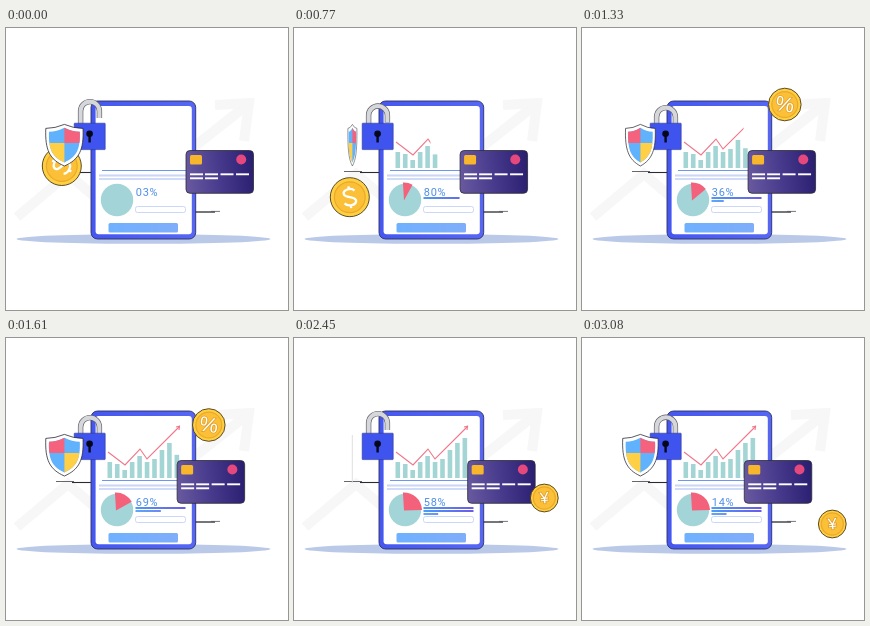
Recreate the animation shown at these times as an HTML page with a canvas. Size 282 px wide and 282 px high, loop 3.15 s.

```html
<!DOCTYPE html>
<html lang="en">
<head>
<meta charset="utf-8">
<title>Secure payments</title>
<style>
  html, body { margin: 0; width: 100%; height: 100%; overflow: hidden; background: #fff; }
  canvas { display: block; width: 282px; height: 282px; }
</style>
</head>
<body>
<canvas id="stage"></canvas>
<script>
const SIZE = 282, LOOP = 3150, STEP = 70, CYCLE = 2100;
const canvas = document.getElementById('stage');
const dpr = window.devicePixelRatio || 1;
canvas.width = canvas.height = SIZE * dpr;
const c = canvas.getContext('2d');
const SANS = '"Liberation Sans", Arial, sans-serif';
const EDGE = '#2b2b34';

const clamp = (v, lo, hi) => Math.min(hi, Math.max(lo, v));

// Piecewise linear value through [time, value] points
function track(points, t) {
  for (let i = 1; i < points.length; i++) {
    const [t0, v0] = points[i - 1], [t1, v1] = points[i];
    if (t <= t1) return v0 + (v1 - v0) * (t - t0) / (t1 - t0);
  }
  return points[points.length - 1][1];
}

function paint(fill, stroke, width) {
  if (fill) { c.fillStyle = fill; c.fill(); }
  if (stroke) { c.strokeStyle = stroke; c.lineWidth = width; c.stroke(); }
}

function box(x, y, w, h, r, fill, stroke, width = 1) {
  c.beginPath();
  c.roundRect(x, y, w, h, r);
  paint(fill, stroke, width);
}

function disc(x, y, r, fill, stroke, width = 1) {
  c.beginPath();
  c.arc(x, y, r, 0, Math.PI * 2);
  paint(fill, stroke, width);
}

function line(points, color, width) {
  c.beginPath();
  points.forEach(([x, y]) => c.lineTo(x, y));
  paint(null, color, width);
}

function ramp(x0, y0, x1, y1, ...colors) {
  const g = c.createLinearGradient(x0, y0, x1, y1);
  colors.forEach((col, i) => g.addColorStop(i / (colors.length - 1), col));
  return g;
}

function backdrop() {
  line([[11, 189], [62, 146], [96, 175], [150, 149], [241, 77]], '#f7f7f7', 10);
  line([[209, 77], [243, 75], [238, 113]], '#f7f7f7', 10);
  c.beginPath();
  c.ellipse(137.5, 211, 127, 4.8, 0, 0, Math.PI * 2);
  paint('#bac9e8');
  line([[50, 143.5], [68, 143.5]], '#55565c', 0.9);
  line([[66, 144.5], [86, 144.5]], EDGE, 1.1);
  line([[189, 184], [209, 184]], EDGE, 1.3);
  line([[205, 183.4], [214, 183.4]], '#55565c', 0.8);
}

function phone() {
  box(85, 73, 104.7, 138, 6.5, ramp(85, 0, 190, 0, '#4557ee', '#5767f4'), '#2c2f66', 0.9);
  box(89.6, 78, 96.2, 128.2, 3, '#fff');
  line([[96, 142.5], [182, 142.5]], '#6d96ee', 1.1);
  line([[93, 147.5], [186, 147.5]], '#ccd6f8', 2);
  line([[93, 151], [186, 151]], '#d0daf9', 2.2);
  box(129.5, 178.5, 50, 6, 2, '#fff', '#cbd7f8', 1);
  box(102.5, 195, 69.5, 9.5, 1.5, ramp(102, 0, 172, 0, '#6fb1ff', '#7fadfa'));
}

const BARS = [16, 14, 8, 16, 22, 16, 19, 28, 35, 40];
const TREND = [[102, 114], [119, 127], [134, 111], [141, 121], [174, 88]];

function chart(t) {
  const grown = track([[0, 0], [490, 4.15], [1050, 7.55], [1610, 9.58], [1720, 10]], t);
  c.fillStyle = '#a3d5d5';
  BARS.forEach((h, i) => {
    const now = h * clamp(grown - i, 0, 1);
    c.fillRect(101.5 + i * 7.45, 140 - now, 4.6, now);
  });

  const reach = 102 + t * 0.0448;
  if (reach > 102) {
    c.save();
    c.beginPath();
    c.rect(95, 80, reach - 95, 60);
    c.clip();
    line(TREND, '#f0768a', 1.1);
    c.restore();
  }
  if (reach >= 173) line([[170, 89], [173.5, 88.3], [173, 92]], '#f0768a', 1.1);
}

function pie(t) {
  disc(111, 172, 16.2, '#a3d5d8');
  const angle = Math.min(90, t * 0.039) * Math.PI / 180;
  if (!angle) return;
  const x = 110, y = 172.5, top = -Math.PI / 2 - 0.06;
  c.beginPath();
  c.moveTo(x, y);
  c.arc(x, y, 18, top, top + angle + 0.03);
  c.closePath();
  paint('#f4617b');
}

function stats(t) {
  const tick = Math.floor((t + 85) / 110) % 9;
  const value = Math.floor(3 + tick * 100 / 9);
  c.fillStyle = '#4f8ee6';
  c.font = '11px Roboto, ' + SANS;
  c.letterSpacing = '0.7px';
  c.textAlign = 'left';
  c.textBaseline = 'alphabetic';
  c.fillText(String(value).padStart(2, '0') + '%', 129.8, 167.8);
  c.letterSpacing = '0px';

  const total = Math.min(115, t * 0.0468);
  const blend = ramp(130, 0, 180, 0, '#4d9cf5', '#6c5ae6');
  for (let i = 0; i < 3; i++) {
    const w = clamp(total - i * 50, 0, 50);
    if (w) line([[129.5, 170 + i * 3], [129.5 + w, 170 + i * 3]], blend, 1.8);
  }
}

function coin(x, y, r, turn, sign) {
  disc(x, y, r - 0.5, '#ffcf42', '#4a3c1c', 0.9);
  disc(x, y, r * 0.77, '#fbc038', '#eba92a', 1.2);
  c.save();
  c.translate(x, y);
  c.rotate(turn);
  sign();
  c.restore();
}

function glyph(text, size) {
  c.font = size + 'px ' + SANS;
  c.textAlign = 'center';
  c.textBaseline = 'middle';
  c.lineWidth = 1.6;
  c.strokeStyle = '#e2a02a';
  c.strokeText(text, 0, 1);
  c.fillStyle = '#fff';
  c.fillText(text, 0, 1);
}

function dollar() {
  c.beginPath();
  c.moveTo(5.5, -6);
  c.bezierCurveTo(2, -10, -6.5, -8, -5.5, -3.5);
  c.bezierCurveTo(-4.5, 0.5, 5, -0.5, 5.8, 4);
  c.bezierCurveTo(6, 9, -3, 9.5, -6, 5.5);
  c.moveTo(0, -11);
  c.lineTo(0, -8);
  c.moveTo(0, 8);
  c.lineTo(0, 11);
  paint(null, '#fff', 2.3);
}

function firstCoin(t) {
  if (t < 840) coin(55.8, 138 + t * 0.0405, 20, -1.05 + t * 0.0012, dollar);
}

function laterCoins(t) {
  if (t >= 910 && t < 2100) {
    coin(202.8, 66 + (t - 1050) * 0.0375, 16.8, 0.16, () => glyph('%', 21));
  } else if (t >= 2100) {
    coin(250.3, 160 + (t - 2450) * 0.0413, 14.4, -0.1, () => glyph('¥', 16));
  }
}

function card(t) {
  const phase = (t % CYCLE) / CYCLE;
  const x = 161 + 19 * Math.abs(1 - 2 * phase);
  c.save();
  c.translate(x, 122);
  box(0, 0.5, 67.5, 42.8, 4, ramp(0, 25, 67, 18, '#67589f', '#473a8c', '#2b1f72'), EDGE, 0.8);
  box(4, 5, 12, 9.5, 1.5, '#f8b62c');
  disc(55.2, 9.5, 5, '#e5487c');
  [4, 19, 34.5, 50].forEach((lx, i) => {
    line([[lx, 24.3], [lx + 13, 24.3]], '#fff', 1.9);
    if (i < 2) line([[lx, 28.3], [lx + 13, 28.3]], '#fff', 1.9);
  });
  c.restore();
}

function lock(t) {
  const top = 71 + 6 * Math.min(1, (t % CYCLE) / 1050);
  for (const [color, width] of [['#5c5c63', 5.4], ['#d6d7db', 4.1]]) {
    c.beginPath();
    c.moveTo(74.6, 98);
    c.lineTo(74.6, top + 12);
    c.arc(84, top + 12, 9.4, Math.PI, 0);
    c.lineTo(93.4, top + 19);
    paint(null, color, width);
  }
  box(68.2, 95.2, 31, 26.4, 0.5, '#3f53ef', '#2c3696', 0.6);
  disc(83.6, 105.8, 3.3, '#05071a');
  line([[83.6, 106], [83.6, 114.5]], '#05071a', 2.4);
}

function shieldPath(w, top, bottom) {
  const shoulder = top + 4;
  c.beginPath();
  c.moveTo(0, top);
  c.quadraticCurveTo(w * 0.5, shoulder, w, shoulder);
  c.bezierCurveTo(w * 1.05, 1 + bottom * 0.25, w * 0.8, bottom * 0.72, 0, bottom);
  c.bezierCurveTo(-w * 0.8, bottom * 0.72, -w * 1.05, 1 + bottom * 0.25, -w, shoulder);
  c.quadraticCurveTo(-w * 0.5, shoulder, 0, top);
  c.closePath();
}

const SPIN = [[0, 0], [490, 46], [1050, 106], [1610, 180], [1960, 206],
  [2240, 240], [2450, 270], [2800, 309], [3080, 342], [3150, 360]];

function shield(t) {
  const turn = Math.cos(track(SPIN, t) * Math.PI / 180);
  if (Math.abs(turn) < 0.04) {
    line([[58.3, 97], [58.3, 145]], '#dcdce0', 0.9);
    return;
  }
  c.save();
  c.translate(58.4, 115);
  c.scale(turn, 1);
  shieldPath(18.6, -18.6, 23);
  paint('#fff', EDGE, 0.8);
  shieldPath(15.4, -15.2, 19.4);
  c.clip();
  c.fillStyle = '#5fb2fb';
  c.fillRect(-20, -20, 40, 45);
  c.fillStyle = '#f4627e';
  c.fillRect(0, -20, 20, 20);
  c.fillStyle = '#ffd046';
  c.fillRect(-20, 0, 20, 25);
  c.restore();
}

function draw(now) {
  const t = Math.floor((now % LOOP) / STEP) * STEP;
  c.setTransform(dpr, 0, 0, dpr, 0, 0);
  c.fillStyle = '#fff';
  c.fillRect(0, 0, SIZE, SIZE);
  backdrop();
  firstCoin(t);
  phone();
  chart(t);
  pie(t);
  stats(t);
  card(t);
  laterCoins(t);
  lock(t);
  shield(t);
}

const start = performance.now();
function tick() {
  draw(performance.now() - start);
  requestAnimationFrame(tick);
}
tick();
</script>
</body>
</html>
```
